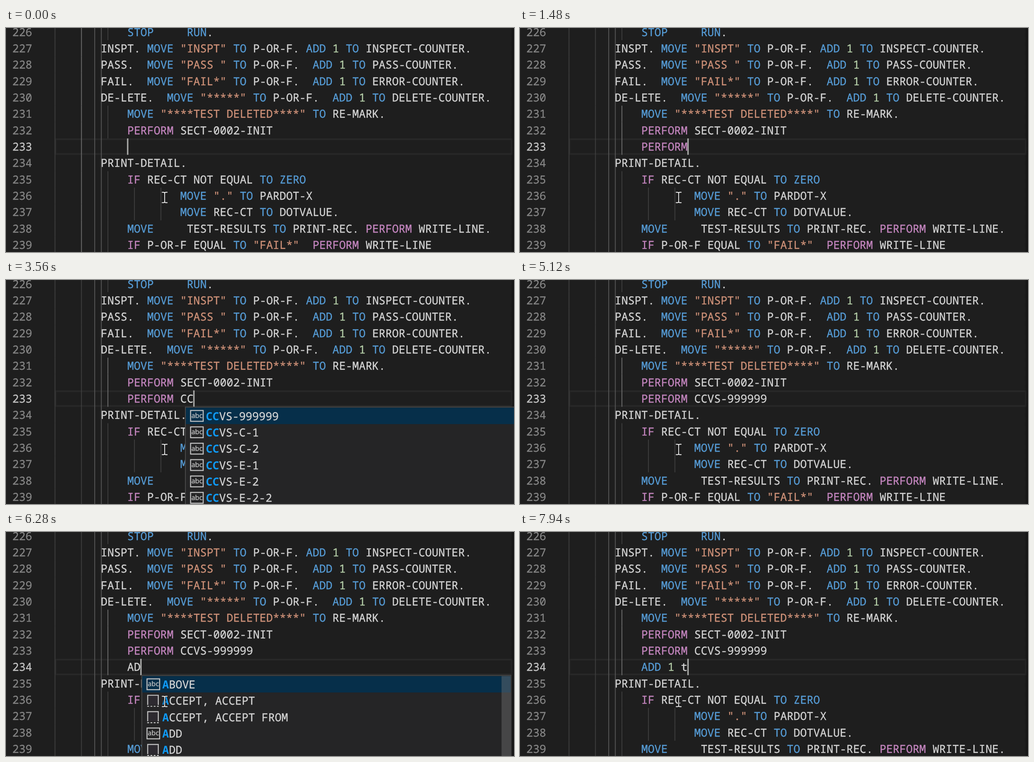
Recreate the animation shown at these times as an HTML page. Size 1127 px wide and 497 px high, loop 8000 ms.

```html
<!DOCTYPE html>
<html lang="en">
<head>
<meta charset="utf-8">
<title>Code completion</title>
<style>
  html, body { margin: 0; width: 100%; height: 100%; overflow: hidden; background: #1e1e1e; }
  svg { display: block; width: 1127px; height: 497px; }
  text { font: 24.48px "Noto Sans Mono", monospace; color: #d4d4d4; fill: currentColor; stroke: currentColor; stroke-width: .35; white-space: pre; text-rendering: geometricPrecision; }
  .key { color: #569cd6; }
  .flow { color: #c586c0; }
  .str { color: #ce9178; }
  .num { color: #b5cea8; }
  .no { color: #858585; }
  .no.on { color: #c6c6c6; }
  .hit { color: #0f9bf8; fill: currentColor; stroke: none; font-weight: 700; }
  .abc { font: 15px "Open Sans", sans-serif; color: #c5c5c5; text-anchor: middle; }
  .icon { fill: none; stroke: #c5c5c5; stroke-width: 2.2; }
  .box { fill: #2d2a30; }
</style>
</head>
<body>
<svg viewBox="0 0 1127 497">
  <defs>
    <linearGradient id="shade"><stop stop-opacity="0"/><stop offset="1" stop-opacity=".4"/></linearGradient>
    <g id="word">
      <rect class="icon" x="11.5" y="-12" width="28" height="24"/>
      <text class="abc" x="25.5" y="4.5">abc</text>
    </g>
    <g id="snippet">
      <path class="icon box" d="M13 9.5V-12H36.5V9.5"/>
      <path class="icon" d="M12 12.5H38" stroke-dasharray="4 3.2"/>
    </g>
    <path id="beam" fill="none" stroke-linecap="square" d="M346.5 364.5h3q2.5 0 2.5 2.5v18q0 2.5-2.5 2.5h-3M357.5 364.5h-3q-2.5 0-2.5 2.5v18q0 2.5 2.5 2.5h3"/>
  </defs>
  <g id="editor"></g>
  <rect x="1119" width="8" height="497" fill="url(#shade)"/>
  <g id="popup"></g>
  <use href="#beam" stroke="#111" stroke-width="3.6"/>
  <use href="#beam" stroke="#eee" stroke-width="1.8"/>
</svg>
<script>
const LOOP = 8000, X0 = 107.4, CH = 14.688, LH = 36.35, FIRST = 226, EDIT = 7, INDENT = 11;
const colX = c => X0 + c * CH;
const rowY = r => 245 + (r - EDIT) * LH;

const above = `           STOP     RUN.
       INSPT. MOVE "INSPT" TO P-OR-F. ADD 1 TO INSPECT-COUNTER.
       PASS.  MOVE "PASS " TO P-OR-F.  ADD 1 TO PASS-COUNTER.
       FAIL.  MOVE "FAIL*" TO P-OR-F.  ADD 1 TO ERROR-COUNTER.
       DE-LETE.  MOVE "*****" TO P-OR-F.  ADD 1 TO DELETE-COUNTER.
           MOVE "****TEST DELETED****" TO RE-MARK.
           PERFORM SECT-0002-INIT`.split('\n');
const below = `       PRINT-DETAIL.
           IF REC-CT NOT EQUAL TO ZERO
                   MOVE "." TO PARDOT-X
                   MOVE REC-CT TO DOTVALUE.
           MOVE     TEST-RESULTS TO PRINT-REC. PERFORM WRITE-LINE.
           IF P-OR-F EQUAL TO "FAIL*"  PERFORM WRITE-LINE`.split('\n');

// A leading + marks a snippet.
const list = s => s.split('|');
const P = list('PACKED-DECIMAL|PADDING|PAGE|PARDOT-X|PASS|PASS-COUNTER');
const PER = list('PERFORM|+PERFORM, PERFORM|+PERFORM, PERFORM VARYING|+perform, perform|+perform, perform varying|+perform, select-to-section');
const C = list('CALL|+CALL, CALL|CANCEL|CCVS-999999|CCVS-C-1|CCVS-C-2');
const CC = list('CCVS-999999|CCVS-C-1|CCVS-C-2|CCVS-E-1|CCVS-E-2|CCVS-E-2-2');
const A = list('ABOVE|+ACCEPT, ACCEPT|+ACCEPT, ACCEPT FROM|ADD|+ADD');
const AD = list('ADD|+ADD|+add|ADVANCING|+add, add');
const ADD = AD.slice(0, 3);

const L1 = 'PERFORM CCVS-999999';
const L2 = L1 + '\n';
// time, typed text, caret shown, suggestions, matched letters
const steps = [
  [0, '', 1],
  [70, 'P', 1],
  [160, 'P', 1, P, 1],
  [390, 'PE', 1, PER, 2],
  [620, 'PER', 1, PER, 3],
  [1080, 'PER', 0, PER, 3],
  [1400, 'PERFORM', 1],
  [1860, 'PERFORM ', 1],
  [2410, 'PERFORM ', 0],
  [2870, 'PERFORM ', 1],
  [3250, 'PERFORM C', 1],
  [3330, 'PERFORM C', 1, C, 1],
  [3560, 'PERFORM CC', 1, CC, 2],
  [3960, 'PERFORM CC', 0, CC, 2],
  [4490, 'PERFORM CC', 1, CC, 2],
  [4660, L1, 1],
  [5120, L1, 0],
  [5500, L2, 1],
  [5960, L2, 0],
  [6040, L2 + 'A', 1],
  [6120, L2 + 'A', 1, A, 1],
  [6280, L2 + 'AD', 1, A, 1],
  [6370, L2 + 'AD', 1, AD, 2],
  [6520, L2 + 'ADD', 1, ADD, 3],
  [6920, L2 + 'ADD ', 1],
  [7390, L2 + 'ADD ', 0],
  [7460, L2 + 'ADD 1', 1],
  [7540, L2 + 'ADD 1 ', 1],
  [7940, L2 + 'ADD 1 t', 1]
];

const rect = (x, y, w, h, fill, more = '') =>
  `<rect x="${x}" y="${y}" width="${w}" height="${h}" fill="${fill}" ${more}/>`;
const text = (x, y, s, cls = '') => `<text x="${x}" y="${y}" class="${cls}">${s}</text>`;

function kind(word) {
  if (word[0] === '"') return 'str';
  if (/^(IF|PERFORM)$/.test(word)) return 'flow';
  if (/^(MOVE|TO|ADD|STOP|RUN|ZERO)$/.test(word)) return 'key';
  return /^\d+$/.test(word) ? 'num' : '';
}

const drawLine = (line, row) => [...line.matchAll(/"[^"]*"|[\w-]+|\./g)]
  .map(m => text(colX(m.index), rowY(row) + 27, m[0], kind(m[0]))).join('');

function guides(lines, row, blank) {
  let out = '';
  lines.forEach((line, r) => {
    const depth = line.trim() ? line.search(/\S/) : 7;
    for (let c = 0; c < depth; c += 4) {
      const lit = blank ? c === 4 : c === 8 && r >= 5 && r <= row;
      out += rect(colX(c) + 0.4, rowY(r), 1.7, LH, lit ? '#707070' : '#404040');
    }
  });
  return out + [6, 7].map(c => rect(colX(c) + 0.4, 0, 1.7, 497, '#5a5a5a')).join('');
}

function drawPopup(x, y, items, hits) {
  const w = 819, h = items.length * LH + 4;
  let out = rect(x, y, w, h, '#252526', 'stroke="#454545" stroke-width="2"')
    + rect(x + 1, y + 1.5, w - 2, LH, '#062f4a');
  items.forEach((item, i) => {
    const mid = y + 1.5 + (i + 0.5) * LH, name = item.replace('+', '');
    out += `<use href="#${name === item ? 'word' : 'snippet'}" x="${x}" y="${mid}"/>`
      + text(x + 45.5, mid + 9, `<tspan class="hit">${name.slice(0, hits)}</tspan>${name.slice(hits)}`);
  });
  if (items.length > 3) out += rect(x + 798, y + 1.5, 20, h, '#797979', 'fill-opacity=".4"');
  return out;
}

const editor = document.getElementById('editor');
const popup = document.getElementById('popup');

function draw([, typed, caret, items, hits]) {
  const typedLines = typed.split('\n');
  const row = EDIT + typedLines.length - 1;
  const last = typedLines[typedLines.length - 1];
  const lines = [...above, ...typedLines.map(s => ' '.repeat(INDENT) + s), ...below].slice(0, 14);
  const x = colX(INDENT + last.length), y = rowY(row);

  editor.innerHTML = rect(110, y + 1.8, 1012, LH - 3.6, 'none', 'stroke="#282828" stroke-width="3.6"')
    + guides(lines, row, !last)
    + lines.map((s, r) => text(14, rowY(r) + 27, FIRST + r, r === row ? 'no on' : 'no') + drawLine(s, r)).join('')
    + (caret ? rect(x - 0.5, y, 3, LH, '#aeafad') : '');
  popup.innerHTML = items ? drawPopup(Math.min(x + 3, 398), y + LH + 0.5, items, hits) : '';
}

let shown;
function tick() {
  const t = performance.now() % LOOP;
  const step = steps.findLast(s => s[0] <= t);
  if (step !== shown) draw(shown = step);
  requestAnimationFrame(tick);
}
tick();
</script>
</body>
</html>
```
